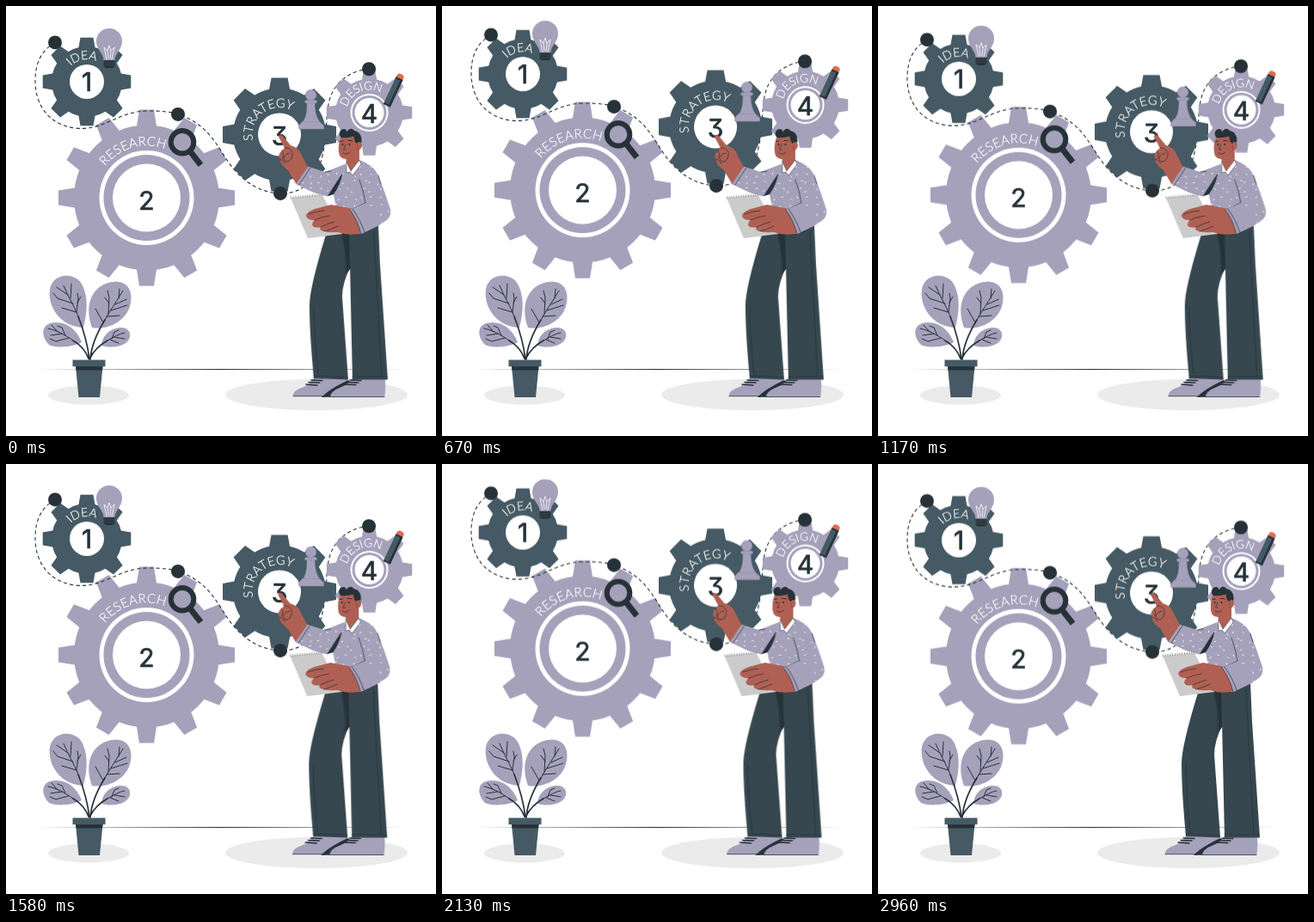
These frames come from a looping animation (500x500 px, 3 s). An HTML page:

```html
<!DOCTYPE html>
<html lang="en">
<head>
<meta charset="utf-8">
<title>Four steps</title>
<style>
html, body { margin: 0; width: 100%; height: 100%; overflow: hidden; background: #fff; }
svg { display: block; width: 100vw; height: 100vh; }
.slate { fill: #455a64; }
.lilac { fill: #a5a1bb; }
.ink { fill: #263238; }
.skin { fill: #b06053; }
.cloth { fill: #37474f; }
.line { fill: none; stroke: #263238; stroke-width: 1; stroke-linecap: round; stroke-linejoin: round; }
.thin { stroke-width: .7; }
.pale { fill: none; stroke: #fff; stroke-width: .8; stroke-linecap: round; stroke-linejoin: round; }
.label { font-family: Lato, "Open Sans", sans-serif; font-weight: 300; fill: #fff; stroke: #fff; stroke-width: .25; text-anchor: middle; }
.digit { font: 400 30px Inter, "Open Sans", sans-serif; font-feature-settings: "cv09"; fill: #263238;
  stroke: #263238; stroke-width: .7; stroke-linejoin: round; text-anchor: middle; }
</style>
</head>
<body>
<svg viewBox="0 0 500 500">
  <defs>
    <clipPath id="shirtClip"><use href="#shirt"/></clipPath>
  </defs>

  <ellipse cx="96" cy="452.5" rx="47" ry="11" fill="#ebebeb"/>
  <ellipse cx="361" cy="452" rx="106" ry="18" fill="#ebebeb"/>
  <path class="ink" d="M36 422.5 L250 421.9 L467 422.5 L250 423.1Z"/>

  <g id="plant">
    <path class="lilac" d="M90 374 C62 373 48 348 51 329 C55 309 82 309 89 325 C97 342 93 362 90 374Z"/>
    <path class="lilac" d="M100 374 C91 350 98 326 122 321 C145 317 149 337 143 352 C136 369 115 377 100 374Z"/>
    <path class="lilac" d="M88 391 C78 397 57 398 50 394 C40 384 40 368 58 368 C74 368 83 379 88 391Z"/>
    <path class="lilac" d="M111 395 C112 382 122 374 135 374 C146 375 147 386 139 392 C130 398 118 397 111 395Z"/>
    <g class="line">
      <path style="stroke-width:1.7" d="M97 411 C95 393 89 374 84 361 M98 411 C99 396 107 378 115 365 M96 410 C92 399 85 393 78 389 M98 409 C103 399 111 393 118 389"/>
      <path d="M84 361 C79 348 72 338 67 325 M115 365 C121 354 129 343 136 331 M78 389 C68 382 59 377 49 375 M118 389 C125 385 132 381 138 380"/>
      <path d="M82 356 L84 340 L83 334 M83 345 L87 338 M78 346 L60 340 L55 334 M82 356 L65 351 M72 336 L59 327 M75 340 L76 323"/>
      <path d="M119 358 L120 339 L118 331 M120 346 L115 339 M113 368 L104 352 M127 347 L140 341 M122 354 L141 348 M131 340 L132 329 M117 361 L132 360"/>
      <path d="M69 383 L65 374 L60 372 M60 379 L53 371 M73 386 L58 390 L51 387 M65 381 L52 383 M123 387 L126 379 L131 377 M126 385 L138 387 M121 388 L131 392"/>
    </g>
    <path class="slate" d="M81 419 H112.5 L109 455 H84.5Z"/>
    <path class="ink" d="M81 419 H112.5 L112 423.5 H81.5Z"/>
    <rect class="slate" x="77.5" y="411.5" width="38" height="7.7"/>
  </g>

  <g id="steps">
    <g id="back"></g>
    <path class="line" style="stroke-dasharray:4.2 3.2;stroke-linecap:butt;stroke-width:1.1"
      d="M57 42.5 C41 52 34 66 34 87 C34 117 51 138 80 142 C114 146 130 122 165 122 C181 122 191 123 200 126 C240 139 247 169 265 190 C280 207 297 217 319 218 C347 219 362 198 367 178 C374 151 371 129 376 110 C382 88 399 76 422 73"/>
    <g id="front"></g>

    <g id="bulb">
      <path class="lilac" d="M113.5 63 C113.5 55 105 51 105 41 A15 15 0 0 1 135 41 C135 51 126.5 55 126.5 63Z"/>
      <path class="pale" d="M117 62 L114 48 L118 52 L120 46 L122 52 L126 48 L123 62 M118 52 L119 61 M122 52 L121 61"/>
      <path class="ink" d="M113.5 63.5 H126.5 V70 Q125 72 123 72 H117 Q115 72 113.5 70Z"/>
      <path d="M113.5 66 H126.5 M113.5 69 H126.5" stroke="#455a64" stroke-width=".7"/>
    </g>

    <g id="glass">
      <circle cx="205" cy="158.3" r="13.3" fill="none" stroke="#263238" stroke-width="6"/>
      <path d="M213.5 168.5 L226.5 185" stroke="#263238" stroke-width="7"/>
    </g>

    <g id="pawn" class="lilac" stroke="#8f8ba6" stroke-width=".5">
      <path d="M350 112 H359 C359 123 361 130 365 135 H345 C349 130 350 123 350 112Z"/>
      <rect x="347.5" y="109.5" width="14" height="3.5" rx="1.7"/>
      <circle cx="354.5" cy="103.5" r="6.3"/>
      <path d="M344.5 134.5 H364.5 L369.5 139 V143 H340.5 V139Z"/>
    </g>

    <g id="pencil" transform="translate(459 81) rotate(25)">
      <path d="M-4.2 3.5 V1 Q-4 -2 0 -2 Q4 -2 4.2 1 V3.5Z" fill="#e8694a"/>
      <path class="slate" d="M-4.4 3.5 H4.4 V38 H-4.4Z"/>
      <path class="ink" d="M-4.4 3.5 H4.4 V5.5 H-4.4Z M1.8 5 H4.4 V38 H1.8Z M-4.4 36.5 H4.4 V38.5 H-4.4Z"/>
    </g>

    <g id="dots" class="ink">
      <circle cx="57" cy="42.5" r="8"/>
      <circle cx="200" cy="126" r="8"/>
      <circle cx="319" cy="218" r="8"/>
      <circle cx="422" cy="73.3" r="8"/>
    </g>
  </g>

  <g id="man">
    <g id="shoes">
      <path class="lilac" d="M334 454 Q333 447 346 443 Q355 439 358 432 H398 L397 438 Q383 444 371 454Z"/>
      <path class="ink" d="M367 455 Q375 446 398 435 L401 437 L380 454.5Z"/>
      <path class="lilac" d="M377 455 Q377 448 390 443 Q400 439 403 432 H441 Q442 447 440 455Z"/>
      <path class="line" style="stroke-width:1.3" d="M349 440 L362 441 M352 437.5 L365 438 M355 435 L368 435.5 M393 440 L407 440.5 M397 437.5 L410 438 M400 435 L413 435.5"/>
      <path class="line thin" d="M334 453.7 H369 M376 454.5 H440"/>
    </g>

    <g id="trousers">
      <path class="cloth" d="M372 266 L400 260 L402 300 Q391 322 391 338 L398 434.5 L358 433 Q353 380 353 348 Q353 328 372 266Z"/>
      <path class="ink" d="M391 264 L400 262 L402 303 L396 312 Q397 290 391 264Z"/>
      <path class="cloth" d="M399 260 L433 254 L435 300 L444 434.5 H403 L400 300Z"/>
      <path class="line thin" d="M363 428 Q358 385 358 350 M428 262 L431 320 L437 430 M391 268 Q397 290 394 312 M358 430 L397 431.5 M403 431 H443"/>
    </g>

    <path id="shirt" class="lilac" d="M351 186.5 L371 193 Q384 188 394 184 L411 179 Q428 185 433 197 Q441 217 447 236 Q449 246 440 251 L434 255 L413 265 L400 263 L386 245 L381 219 L374 221.5 L358 217 L337 207Z"/>
    <g id="pattern" clip-path="url(#shirtClip)"></g>
    <path class="ink" d="M374 221 Q383 207 391.5 194 Q389 208 381 219Z"/>
    <path class="line thin" d="M354 188 L341 208 M411 202 Q416 215 418 229 L401 237 M418 229 L410 233 M371 193 L378 192 M433 197 L436 207"/>

    <g id="head">
      <path class="skin" d="M395 172 L411 165 L411 183 Q407 190 400 194 L396 184Z"/>
      <path class="skin" d="M390 151 Q386 159 387 170 Q388 178 396 178 Q406 177 409 168 Q414 167 414 161 Q412 157 409 159 L408 150Z"/>
      <path class="ink" d="M390 153 C386 150 388 143 393 143 C396 143 397 146 396 148 C398 141 404 142 405 145 C411 146 414 151 413.5 157 L412 164 L409 168 L408 160 Q405 158 404.5 151.5 Q397 154 390 153Z"/>
      <path class="skin" d="M408 160 Q411 156 413.5 160 Q414 166 409 167Z"/>
      <ellipse class="ink" cx="391.5" cy="161" rx=".9" ry="1.3"/>
      <ellipse class="ink" cx="399.5" cy="161" rx=".9" ry="1.3"/>
      <path class="line" d="M389 157.5 L392 157 M398 156.5 Q400 155.5 403 157"/>
      <path class="line thin" d="M395 161 L392.5 167 H395 M392 171 Q396 174 400 170"/>
      <path d="M396 181 L401 192 L411 179 L413 184 L403 197 L400 193 L396 194Z" fill="#fff" stroke="#263238" stroke-width=".5"/>
    </g>

    <g id="pointing">
      <path class="skin" d="M317 152 Q318 148 322 151 L331 162 Q341 165 343 172 L351 187 L337.5 207 L328 191 Q318 184 319 178 Q315 173 321 168 L324 165Z"/>
      <path class="line thin" d="M324 165 Q330 164 333 170 Q334 178 328 181 Q323 181 323 176 Q326 171 330 171 M321 168 Q324 172 322 177 M319 178 Q323 179 325 183"/>
    </g>

    <g id="pad">
      <path d="M331 223 L368 219.5 L391 265 L351 270Z" fill="#cbcbcb"/>
      <path d="M331 222.7 L368 219.3" stroke="#8a8f92" stroke-width="3" stroke-dasharray=".8 2"/>
    </g>
    <g id="holding">
      <path class="skin" d="M349 244 Q350 239 359 236 L378 231 L399 235 Q408 236 410 245 L414 264 Q399 268 386 263 Q375 264 370 262 Q363 261 366 257 Q357 259 356 254 Q356 251 359 249 Q350 249 349 244Z"/>
      <path class="line thin" d="M359 249 Q367 245 376 244 M366 257 Q374 253 382 251 M352 242 Q362 238 370 238 M370 262 Q378 260 386 256"/>
      <path class="lilac" d="M400 237 L418 229 L432 241 L434 255 L413 265 Q409 249 400 237Z"/>
      <path class="line thin" d="M400 237 Q409 249 413 265 M403 236 Q412 248 417 263"/>
    </g>
  </g>
</svg>

<script>
const LOOP = 3000;
const LEAD = 40; // the loop opens slightly into its cycle
const SLATE = "#455a64", LILAC = "#a5a1bb", WHITE = "#fff";
const NS = "http://www.w3.org/2000/svg";
const byId = id => document.getElementById(id);

function add(parent, tag, attrs, text) {
  const el = document.createElementNS(NS, tag);
  for (const key in attrs) el.setAttribute(key, attrs[key]);
  if (text) el.textContent = text;
  parent.append(el);
  return el;
}

// rings: [radius, fill] pairs from the outside in; label.mid is the angle of its middle
function gear(layer, g) {
  const box = add(byId(layer), "g", { transform: `translate(${g.x} ${g.y})` });
  const { r, tip, base, top } = g;
  for (let i = 0; i < g.teeth; i++) {
    add(box, "path", {
      d: `M${-base} ${4 - r} L${-top} ${-tip} H${top} L${base} ${4 - r}Z`,
      fill: g.fill, transform: `rotate(${360 / g.teeth * i})`
    });
  }
  for (const [radius, fill] of [[r, g.fill], ...g.rings]) add(box, "circle", { r: radius, fill });

  const { text, size, arc, mid, gap } = g.label;
  const id = "arc" + g.digit;
  const point = deg => {
    const a = deg * Math.PI / 180;
    return `${arc * Math.sin(a)} ${-arc * Math.cos(a)}`;
  };
  add(box, "path", { id, fill: "none", d: `M${point(mid - 120)} A${arc} ${arc} 0 1 1 ${point(mid + 120)}` });
  const label = add(box, "text", { class: "label", "font-size": size, "letter-spacing": gap });
  add(label, "textPath", { href: "#" + id, startOffset: "50%" }, text);
  add(box, "text", { class: "digit", x: 0, y: g.drop + 11 }, g.digit);
}

gear("back", {
  x: 163.5, y: 223, r: 84.5, tip: 102.5, base: 12, top: 8.5, teeth: 12, fill: LILAC,
  rings: [[55, WHITE], [50, LILAC], [39.5, WHITE]],
  label: { text: "RESEARCH", size: 15, arc: 60.5, mid: -16, gap: .4 }, digit: "2", drop: 3
});
gear("front", {
  x: 94, y: 88, r: 41, tip: 51.3, base: 10, top: 7.5, teeth: 8, fill: SLATE,
  rings: [[20, WHITE]],
  label: { text: "IDEA", size: 14, arc: 26, mid: -11, gap: 0 }, digit: "1", drop: 0
});
gear("front", {
  x: 318, y: 149.5, r: 54, tip: 66, base: 12.5, top: 9.5, teeth: 8, fill: SLATE,
  rings: [[25, WHITE]],
  label: { text: "STRATEGY", size: 14.5, arc: 31.5, mid: -37, gap: .3 }, digit: "3", drop: 2
});
gear("front", {
  x: 422.5, y: 124, r: 39.5, tip: 49.7, base: 9, top: 6.8, teeth: 8, fill: LILAC,
  rings: [[22, WHITE], [20, LILAC], [17, WHITE]],
  label: { text: "DESIGN", size: 13.5, arc: 26.5, mid: -23, gap: 0 }, digit: "4", drop: 1
});

// Flecks on the shirt, on a jittered grid
let seed = 7;
const rand = () => (seed = seed * 16807 % 2147483647) / 2147483647;
let flecks = "";
for (let y = 184; y < 264; y += 9) {
  for (let x = 342; x < 448; x += 10) {
    const turn = rand() * Math.PI;
    const px = x + rand() * 6, py = y + rand() * 5;
    flecks += `M${px.toFixed(1)} ${py.toFixed(1)}l${(1.7 * Math.cos(turn)).toFixed(1)} ${(1.7 * Math.sin(turn)).toFixed(1)}`;
  }
}
add(byId("pattern"), "path", { class: "pale", d: flecks });

function sway(id, axis, stops, duration) {
  byId(id).animate(
    stops.map(d => ({ transform: `translate${axis}(${d}px)` })),
    { duration, delay: -LEAD, iterations: Infinity }
  );
}
sway("steps", "Y", [.5, -9.5, .5], LOOP / 2);
sway("man", "X", [0, -1, 2, -4, 4, -4, 4, -4, 2, -1, 0], LOOP);
</script>
</body>
</html>
```
